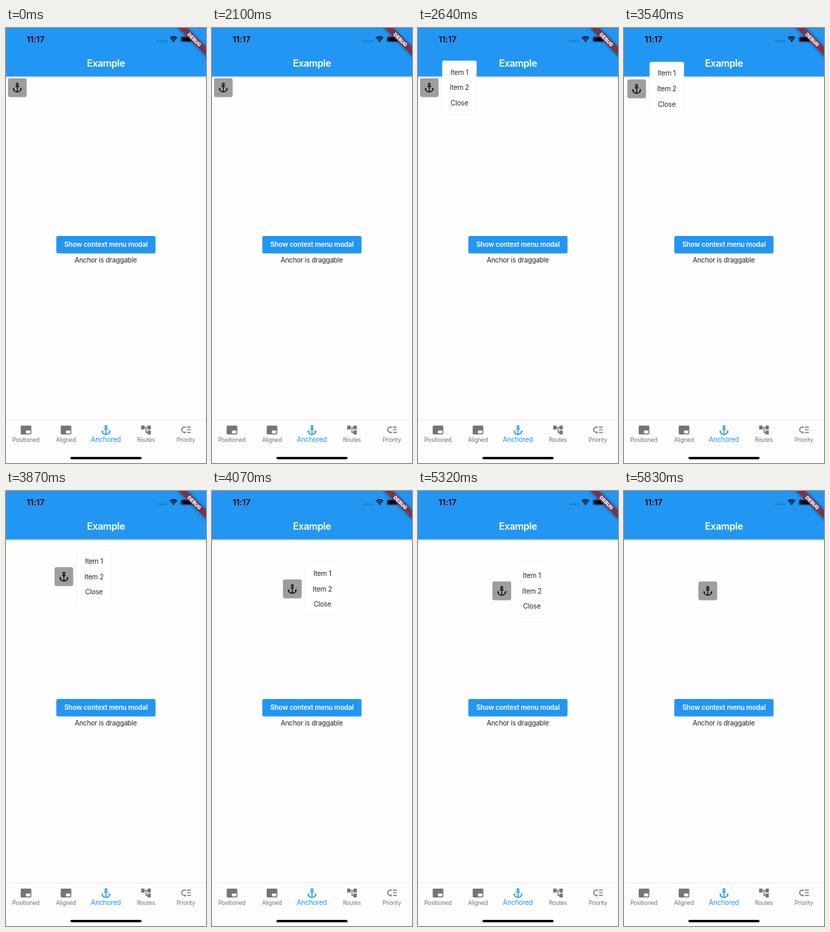
These frames come from a looping animation (296x640 px, 5920 ms). An HTML page:

```html
<!DOCTYPE html>
<html lang="en">
<head>
<meta charset="utf-8">
<title>Anchored context menu</title>
<style>
  html, body { margin: 0; width: 100%; height: 100%; overflow: hidden; background: #fdfdfd; }
  svg { display: block; width: 296px; height: 640px; }
  text { font-family: Inter, Roboto, sans-serif; font-size: 10px; text-anchor: middle; }
  .bar { filter: drop-shadow(0 1px 1.2px rgba(0, 0, 0, .32)); }
  .raised { filter: drop-shadow(0 .7px .7px rgba(0, 0, 0, .3)); }
  .sheet { filter: drop-shadow(0 .6px .7px rgba(0, 0, 0, .18)); }
  .banner { filter: drop-shadow(0 0 2.6px rgba(0, 0, 0, .5)); }
  .nav { filter: drop-shadow(0 -.4px .6px rgba(0, 0, 0, .08)); }
  .body { fill: #262626; letter-spacing: -.17px; }
</style>
</head>
<body>
<svg viewBox="0 0 296 640">
  <defs>
    <path id="anchor" d="M17 15l1.55 1.55c-.96 1.69-3.33 3.04-5.55 3.37V11h3V9h-3V7.82C14.16 7.4 15 6.3 15 5c0-1.65-1.35-3-3-3S9 3.35 9 5c0 1.3.84 2.4 2 2.82V9H8v2h3v8.92c-2.22-.33-4.59-1.68-5.55-3.37L7 15l-4-3v3c0 3.88 4.92 7 9 7s9-3.12 9-7v-3l-4 3zM12 4c.55 0 1 .45 1 1s-.45 1-1 1-1-.45-1-1 .45-1 1-1z"/>
    <path id="corner" d="M21 3H3c-1.1 0-2 .9-2 2v14c0 1.1.9 2 2 2h18c1.1 0 2-.9 2-2V5c0-1.1-.9-2-2-2zm0 16h-9v-6h9v6z"/>
    <path id="tree" d="M22 11V3h-7v3H9V3H2v8h7V8h2v10h4v3h7v-8h-7v3h-2V8h2v3z"/>
    <path id="order" d="M14 5h8v2h-8zm0 5.5h8v2h-8zm0 5.5h8v2h-8zM2 11.5C2 15.08 4.92 18 8.5 18H9v2l3-3-3-3v2h-.5C6.02 16 4 13.98 4 11.5S6.02 7 8.5 7H12V5H8.5C4.92 5 2 7.92 2 11.5z"/>
  </defs>

  <rect width="296" height="640" fill="#fdfdfd"/>

  <rect class="raised" x="74.6" y="305.9" width="146.6" height="25.6" rx="2.6" fill="#2196f3"/>
  <rect id="press" x="74.6" y="305.9" width="146.6" height="25.6" rx="2.6" fill="#fff" opacity="0"/>
  <text x="147.9" y="322.2" fill="#fff" font-weight="600" letter-spacing="-.2">Show context menu modal</text>
  <text class="body" x="147.7" y="344.6">Anchor is draggable</text>

  <rect class="nav" y="576.8" width="296" height="64" fill="#fdfdfd"/>
  <g id="tabs"></g>
  <rect x="95.3" y="630.9" width="105.4" height="3.6" rx="1.8"/>

  <rect class="bar" x="-6" y="-6" width="308" height="77" fill="#2196f3"/>
  <text x="147.9" y="57.1" fill="#fff" style="font-size:14.3px" font-weight="600" letter-spacing="-.4">Example</text>

  <text x="43.7" y="21.1" style="font-size:12px" font-weight="600" letter-spacing=".1">11:17</text>
  <g id="signal" fill="#1b6eb0"></g>
  <g transform="translate(248 20.7)" fill="none" stroke="#000" stroke-width="1.7">
    <path d="M0 0L-2 -2.2A3 3 0 0 1 2 -2.2Z" fill="#000" stroke="none"/>
    <path d="M-3.4 -3.65A5 5 0 0 1 3.4 -3.65"/>
    <path d="M-5.3 -5.7A7.8 7.8 0 0 1 5.3 -5.7"/>
  </g>
  <rect x="258.4" y="12.4" width="17.6" height="8.4" rx="2.4" fill="none" stroke="#000" stroke-opacity=".4" stroke-width=".8"/>
  <rect x="259.6" y="13.5" width="15.2" height="6.2" rx="1.4"/>

  <g id="drag">
    <rect class="raised" x="-13.7" y="-13.7" width="27.4" height="27.4" rx="2.4" fill="#9e9e9e"/>
    <use href="#anchor" transform="translate(-8.58 -8.58) scale(.715)" fill="#141414"/>
    <g id="menu">
      <rect class="sheet" x="-25.5" y="-39.8" width="51" height="79.6" rx="2.6" fill="#fff"/>
      <text class="body" y="-19.2">Item 1</text>
      <text class="body" y="3.6">Item 2</text>
      <text class="body" y="26.4">Close</text>
    </g>
  </g>

  <g transform="translate(296 0) rotate(45)">
    <rect class="banner" x="-34" y="20" width="68" height="8.6" fill="#7c3346"/>
    <text y="26.9" fill="#fff" style="font-size:7.3px" font-weight="900">DEBUG</text>
  </g>
</svg>
<script>
const LOOP = 5920, OPEN = 2100, GRAB = 3540, CLOSE = 5220;
const TICK = 105, CLOSE_TICK = 101.5;   // screen refresh while something moves
const FADE = 420;                       // menu grow and shrink time

const byId = id => document.getElementById(id);
const clamp = v => Math.min(1, Math.max(0, v));
const smooth = p => p * p * (3 - 2 * p);
const easeOut = (p, power) => 1 - (1 - clamp(p)) ** power;
const mix = (a, b, p) => a + (b - a) * p;
const snap = (t, from, tick) => from + Math.floor((t - from) / tick) * tick;

byId('signal').innerHTML = Array.from({ length: 4 }, (_, i) =>
  `<circle cx="${225.2 + i * 4}" cy="19.5" r="1.2"/>`).join('');

const tabs = [['corner', 'Positioned'], ['corner', 'Aligned'], ['anchor', 'Anchored'],
              ['tree', 'Routes'], ['order', 'Priority']];
byId('tabs').innerHTML = tabs.map(([icon, label], i) => {
  const x = 29.6 + i * 59.2;
  const on = label === 'Anchored';
  return `<g fill="${on ? '#2196f3' : '#757575'}">
    <use href="#${icon}" transform="translate(${x - 8.58} 582.9) scale(.715)"/>
    <text x="${x - .2}" y="${on ? 608.6 : 609.1}" style="font-size:${on ? 10 : 8.58}px"
      letter-spacing="-.2">${label}</text></g>`;
}).join('');

function anchorAt(t) {
  if (t < GRAB) return [16.7, 87.7];
  const p = smooth(easeOut((snap(t, GRAB, TICK) - GRAB) / (7 * TICK), 1.6));
  return [mix(18.7, 124, p), mix(89.5, 146.9, p)];
}

function menuScale(t) {
  const left = t < CLOSE
    ? snap(t, OPEN, TICK) - OPEN - TICK
    : CLOSE + 530 - snap(t, CLOSE, CLOSE_TICK);
  return easeOut(left / FADE, 2.4);
}

function draw(t) {
  const [x, y] = anchorAt(t);
  byId('drag').setAttribute('transform', `translate(${x} ${y})`);
  byId('menu').setAttribute('transform', `translate(44.6 0) scale(${menuScale(t)})`);
  const press = clamp((snap(t, OPEN, TICK) - OPEN) / (5 * TICK));
  byId('press').setAttribute('opacity', .12 * Math.sin(Math.PI * press));
}

const start = performance.now();
function frame() {
  draw((performance.now() - start) % LOOP);
  requestAnimationFrame(frame);
}
frame();
</script>
</body>
</html>
```
